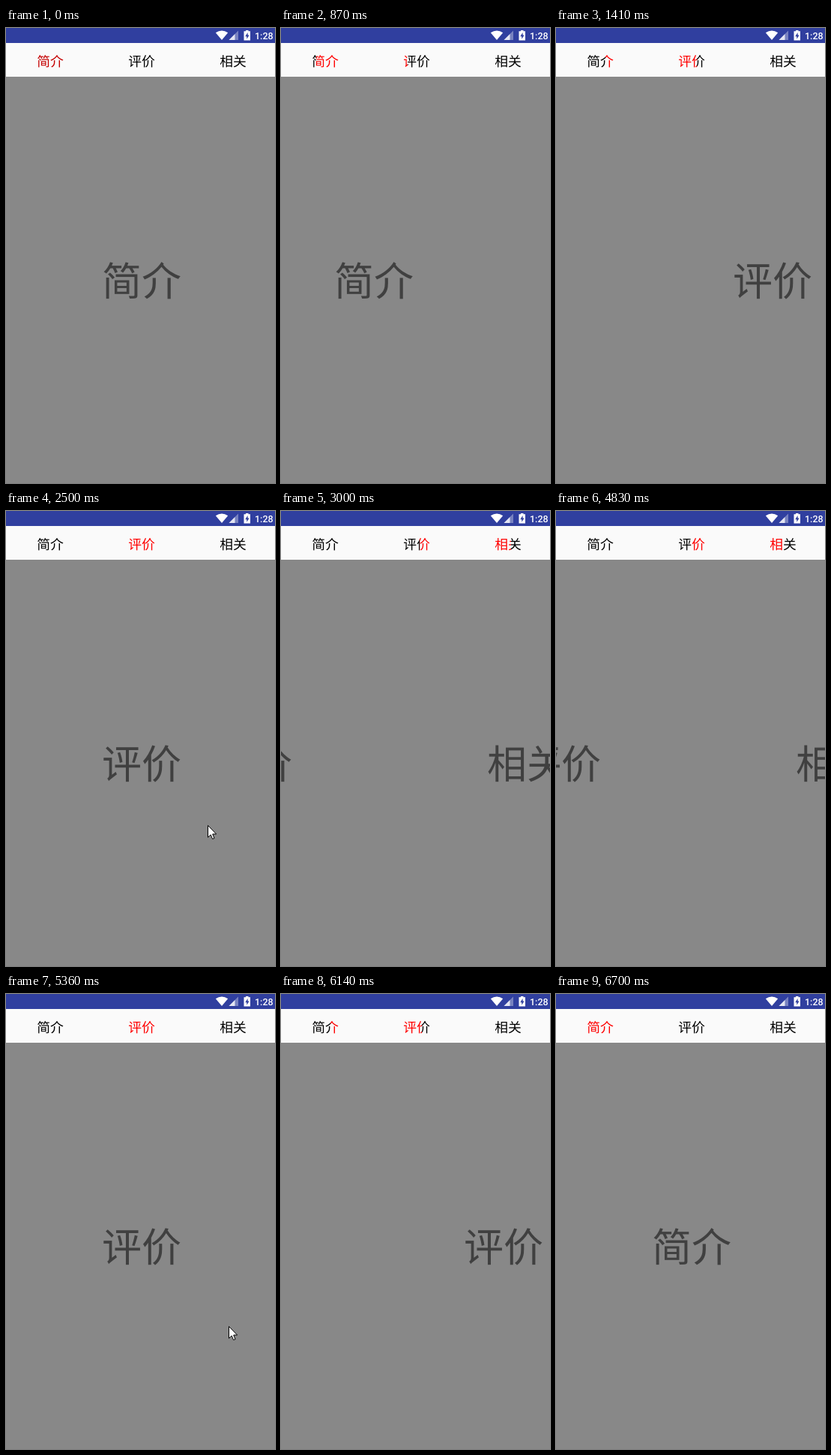
An HTML page for the animation above (7.84 s loop, 359 by 607 pixels).

```html
<!DOCTYPE html>
<html lang="zh-CN">
<head>
<meta charset="utf-8">
<style>
  html, body { margin: 0; width: 100%; height: 100%; overflow: hidden; background: #888; }
  svg { display: block; }
  text { font-family: "Noto Sans CJK SC", "Noto Sans CJK", sans-serif; text-rendering: geometricPrecision; }
  .tab { font-size: 17.8px; }
  .page { font-size: 53px; fill: #404040; }
  .clock { font: 500 12.5px Roboto, sans-serif; fill: #fff; }
</style>
</head>
<body>
<svg width="359" height="607" viewBox="0 0 359 607" lang="zh-CN">
  <defs id="defs"></defs>
  <rect width="359" height="607" fill="#888"/>
  <g id="pages" text-anchor="middle"></g>
  <rect y="20" width="359" height="45" fill="#fafafa"/>
  <g id="tabs" text-anchor="middle"></g>
  <rect width="359" height="20" fill="#303f9f"/>
  <path d="M279.8 6.2Q288 .6 296.2 6.2L288 16Z" fill="#fff"/>
  <path d="M310 3.5V16H297.5Z" fill="#fff" opacity=".35"/>
  <path d="M305.5 8V16H297.5Z" fill="#fff" opacity=".8"/>
  <path d="M320 3H323.5V4.3H326V16.5H317.5V4.3H320Z" fill="#fff"/>
  <path d="M322.6 6L319.2 11.2H321.3V14.8L324.6 9.6H322.6Z" fill="#303f9f"/>
  <text class="clock" x="332" y="15">1:28</text>
  <path id="cursor" d="M.5 .5V16.3L4.2 12.9L6.6 18.5L9 17.5L6.7 12H11.6Z" fill="#fff" stroke="#000"/>
</svg>
<script>
const LOOP = 7840, STEP = 78, PAGE_WIDTH = 366, TAB_PITCH = 122;
const LABELS = ['简介', '评价', '相关'];
const REACH = 0.72, SETTLE = 240, HIDE_DELAY = 60;

// Each swipe: the pointer shows, travels to its grip, presses and drags one page over.
const SWIPES = [
  { show: 70, leave: 70, arrive: 460, press: 690, drag: 717, enter: [324, 561], grip: [294, 443], from: 0, to: 1 },
  { show: 1790, leave: 1790, arrive: 2180, press: 2500, drag: 563, enter: [140, 427], grip: [269, 419], from: 1, to: 2 },
  { show: 3870, leave: 3870, arrive: 4250, press: 4250, drag: 750, enter: [14, 428], grip: [14, 428], from: 2, to: 1 },
  { show: 5200, leave: 5440, arrive: 5820, press: 5900, drag: 530, enter: [297, 443], grip: [52, 425], from: 1, to: 0 }
];

const byId = id => document.getElementById(id);
const clamp = value => Math.max(0, Math.min(1, value));
const mix = (a, b, k) => a + (b - a) * k;

function add(parent, tag, attrs, text = '') {
  const node = document.createElementNS('http://www.w3.org/2000/svg', tag);
  for (const key in attrs) node.setAttribute(key, attrs[key]);
  node.textContent = text;
  return parent.appendChild(node);
}

// Linear while held, then easing out to the next page.
function swipeProgress(elapsed, drag) {
  if (elapsed < drag) return REACH * clamp(elapsed / drag);
  const rest = 1 - clamp((elapsed - drag) / SETTLE);
  return 1 - (1 - REACH) * rest ** 3;
}

const tabStops = LABELS.map((label, i) => {
  const gradient = add(byId('defs'), 'linearGradient', { id: 'split' + i });
  add(byId('tabs'), 'text', { class: 'tab', x: 59 + i * TAB_PITCH, y: 51, fill: `url(#split${i})` }, label);
  add(byId('pages'), 'text', { class: 'page', x: 181 + i * PAGE_WIDTH, y: 357 }, label);
  return [add(gradient, 'stop', {}), add(gradient, 'stop', {})];
});

function drawPager(page, red) {
  byId('pages').setAttribute('transform', `translate(${-Math.round(page * PAGE_WIDTH)} 0)`);
  tabStops.forEach((stops, i) => {
    const passed = page - i;
    const split = clamp(passed < 0 ? 1 + passed : passed);
    const colors = passed < 0 ? [red, '#000'] : ['#000', red];
    stops.forEach((stop, side) => {
      stop.setAttribute('offset', split);
      stop.setAttribute('stop-color', colors[side]);
    });
  });
}

function drawPointer(swipe, time) {
  const visible = time >= swipe.show && time < swipe.press + HIDE_DELAY;
  byId('cursor').style.display = visible ? '' : 'none';
  const k = clamp((time - swipe.leave) / (swipe.arrive - swipe.leave));
  const [x, y] = swipe.enter.map((value, i) => Math.round(mix(value, swipe.grip[i], k)));
  byId('cursor').setAttribute('transform', `translate(${x} ${y})`);
}

function draw(now) {
  const clock = now % LOOP;
  const swipe = SWIPES.filter(({ show }) => clock >= show).pop() || SWIPES[0];
  const elapsed = Math.floor((clock - swipe.press) / STEP) * STEP;
  const progress = swipeProgress(elapsed, swipe.drag);
  drawPager(mix(swipe.from, swipe.to, progress), clock < SWIPES[0].press ? '#c40000' : '#f00');
  drawPointer(swipe, swipe.press + elapsed);
}

const start = performance.now();
function tick() {
  draw(performance.now() - start);
  requestAnimationFrame(tick);
}
tick();
</script>
</body>
</html>
```
